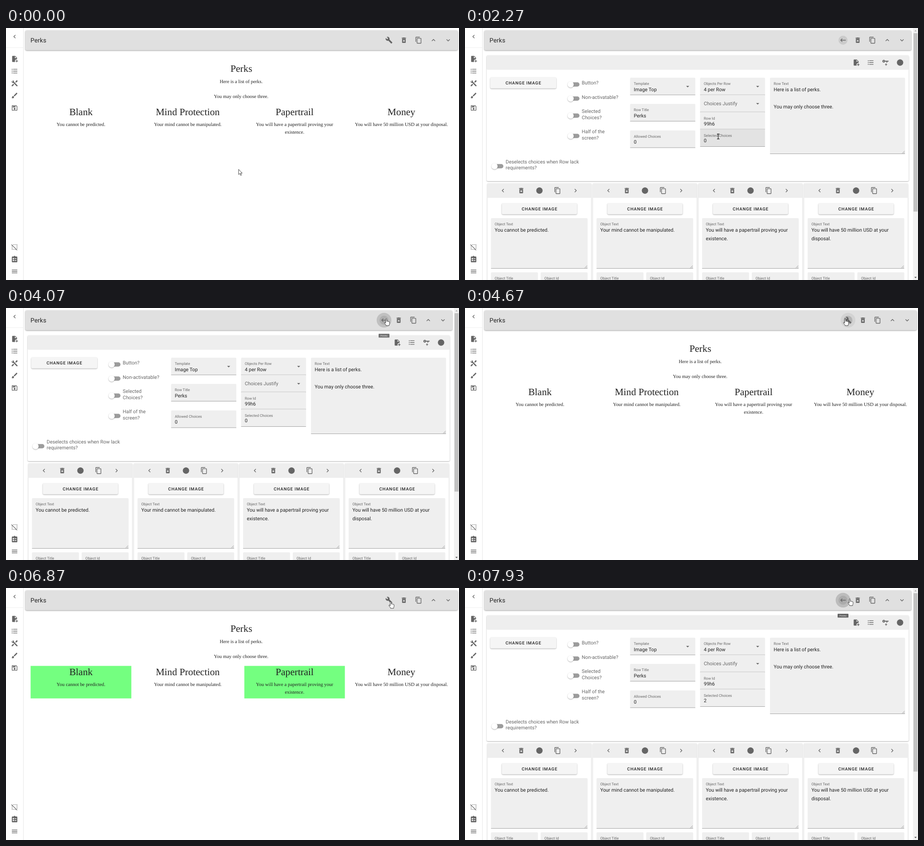
An HTML page that plays this animation: 1003 px wide and 558 px high, repeating every 8000 ms.

```html
<!DOCTYPE html>
<html lang="en">
<head>
<meta charset="utf-8">
<title>Perks editor</title>
<style>
html, body { margin: 0; width: 100%; height: 100%; overflow: hidden; background: #fff; }
svg { display: block; width: 1003px; height: 558px; }
text { font: 10.83px Roboto, sans-serif; fill: #222; text-rendering: geometricPrecision; }
.serif text { font-family: "Liberation Serif", serif; text-anchor: middle; }
.serif .big { font-size: 21.66px; }
.title { font-size: 13.6px; letter-spacing: .17px; }
.small { font-size: 8.12px; fill: #666; }
.gray { fill: #666; }
.btn { font-size: 9.48px; font-weight: 500; letter-spacing: .85px; text-anchor: middle; }
.tip { font-size: 4.4px; fill: #fff; text-anchor: middle; }
.icon { fill: #656565; fill-rule: evenodd; }
.raised { filter: drop-shadow(0 1.2px 1.3px rgba(0,0,0,.32)); }
.bar { filter: drop-shadow(0 1.8px 1.8px rgba(0,0,0,.4)); }
</style>
</head>
<body>
<svg id="stage" viewBox="0 0 1003 558"></svg>
<script>
const LOOP = 8000;
const dots = [6, 12, 18].map(y => `M2.5 ${y}a1.5 1.5 0 1 0 3 0a1.5 1.5 0 1 0-3 0M7 ${y - 1}H21v2H7z`).join('');
const seal = 'M' + Array.from({ length: 28 }, (_, i) => {
  const a = i * Math.PI / 14, r = i % 2 ? 9.8 : 11;
  return (12 + r * Math.cos(a)).toFixed(2) + ' ' + (12 + r * Math.sin(a)).toFixed(2);
}).join('L') + 'Z';

// Icon outlines on a 24 unit grid
const ICONS = {
  left: 'M15.41 16.58L10.83 12L15.41 7.41L14 6L8 12L14 18Z',
  right: 'M8.59 16.58L13.17 12L8.59 7.41L10 6L16 12L10 18Z',
  up: 'M7.41 15.41L12 10.83L16.59 15.41L18 14L12 8L6 14Z',
  down: 'M7.41 8.58L12 13.17L16.59 8.58L18 10L12 16L6 10Z',
  back: 'M21 11H6.83L10.41 7.41L9 6L3 12L9 18L10.41 16.58L6.83 13H21Z',
  drop: 'M7 10L12 15L17 10Z',
  wrench: 'M22.7 19L13.6 9.9C14.5 7.6 14 4.9 12.1 3C10.1 1 7.1 .6 4.7 1.7L9 6L6 9L1.6 4.7C.4 7.1 .9 10.1 2.9 12.1C4.8 14 7.5 14.5 9.8 13.6L18.9 22.7C19.3 23.1 19.9 23.1 20.3 22.7L22.6 20.4C23.1 20 23.1 19.3 22.7 19Z',
  trash: 'M6 19A2 2 0 0 0 8 21H16A2 2 0 0 0 18 19V7H6ZM8.46 11.88L9.87 10.47L12 12.59L14.12 10.47L15.53 11.88L13.41 14L15.53 16.12L14.12 17.53L12 15.41L9.88 17.53L8.47 16.12L10.59 14ZM15.5 4L14.5 3H9.5L8.5 4H5V6H19V4Z',
  copy: 'M19 21H8V7H19ZM19 5H8A2 2 0 0 0 6 7V21A2 2 0 0 0 8 23H19A2 2 0 0 0 21 21V7A2 2 0 0 0 19 5ZM16 1H4A2 2 0 0 0 2 3V17H4V3H16Z',
  addFile: 'M14 2H6A2 2 0 0 0 4 4V20A2 2 0 0 0 6 22H13.8A6 6 0 0 1 20 13.1V8ZM13 9V3.5L18.5 9ZM23 20H20V23H18V20H15V18H18V15H20V18H23Z',
  list: dots,
  tools: 'M21.71 20.29L20.29 21.71A1 1 0 0 1 18.88 21.71L7 9.85A4 4 0 0 1 2.22 4.7L4.76 7.24L7.24 4.76L4.7 2.22A4 4 0 0 1 9.85 7L21.71 18.88A1 1 0 0 1 21.71 20.29ZM2.29 18.88A1 1 0 0 0 2.29 20.29L3.71 21.71A1 1 0 0 0 5.12 21.71L10.59 16.25L7.76 13.42ZM20 2L16 4V6L13.83 8.17L15.83 10.17L18 8H20L22 4Z',
  brush: 'M20.71 4.63L19.37 3.29A1 1 0 0 0 17.96 3.29L9 12.25L11.75 15L20.71 6.04A1 1 0 0 0 20.71 4.63ZM7 14A3 3 0 0 0 4 17C4 18.3 2.8 19 2 19C2.9 20.2 4.5 21 6 21A4 4 0 0 0 10 17A3 3 0 0 0 7 14Z',
  save: 'M17 3H5A2 2 0 0 0 3 5V19A2 2 0 0 0 5 21H19A2 2 0 0 0 21 19V7ZM19 19H5V5H16.2L19 7.8ZM12 12a3 3 0 1 0 .01 0ZM6 6H15V10H6Z',
  unselect: 'M1 4.27L2.28 3L21 21.72L19.73 23L17 20.27V21H15V19H15.73L5 8.27V9H3V7H3.73ZM19 3h2v2h-2zM15 3h2v2h-2zM11 3h2v2h-2zM7 3h2v2h-2zM11 19h2v2h-2zM7 19h2v2h-2zM3 19h2v2h-2zM3 15h2v2h-2zM19 15h2v2h-2zM3 11h2v2h-2zM19 11h2v2h-2zM19 7h2v2h-2z',
  board: 'M19 3H14.8A3 3 0 0 0 9.2 3H5A2 2 0 0 0 3 5V20A2 2 0 0 0 5 22H19A2 2 0 0 0 21 20V5A2 2 0 0 0 19 3ZM6 8h4v4h-4zM6 14h4v4h-4zM12 9h6v2h-6zM12 15h6v2h-6z',
  menu: 'M3 6H21V8H3ZM3 11H21V13H3ZM3 16H21V18H3Z',
  key: 'M6.5 3A4.5 4.5 0 0 1 10.7 6H22V9H18V12H15V9H10.7A4.5 4.5 0 1 1 6.5 3ZM6.5 6a1.5 1.5 0 1 0 .01 0ZM13 15h2v2.5h2.5v2H15V22h-2v-2.5h-2.5v-2H13z',
  seal
};

const icon = (name, x, y) =>
  `<path class="icon" d="${ICONS[name]}" transform="translate(${x} ${y}) scale(.677) translate(-12 -12)"/>`;
const icons = (names, xs, y) => names.split(' ').map((n, i) => icon(n, xs[i], y)).join('');
const rect = (x, y, w, h, fill, cls = '', r = 0) =>
  `<rect x="${x}" y="${y}" width="${w}" height="${h}" rx="${r}" fill="${fill}" class="${cls}"/>`;
const text = (x, y, s, cls = '') => `<text x="${x}" y="${y}" class="${cls}">${s}</text>`;
const lines = (x, y, step, s, cls) => s.split('|').map((l, i) => text(x, y + i * step, l, cls)).join('');
const circle = (id, x, y, r) => `<circle id="${id}" cx="${x}" cy="${y}" r="${r}" opacity="0"/>`;

const field = (x, y, w, h, label, value, id = '') =>
  `<rect id="${id}" x="${x}" y="${y}" width="${w}" height="${h}" rx="2" fill="#efefef"/>` +
  rect(x, y + h - .6, w, .8, '#8e8e8e') +
  text(x + 8.3, y + 16.4, label, 'small') + lines(x + 8.3, y + 29.5, 19, value);
const grip = (x, y) =>
  `<path d="M${x - 6} ${y}l5.5-5.5M${x - 2.8} ${y}l2.3-2.3" stroke="#777" stroke-width=".7"/>`;
const button = (x, y, w) =>
  rect(x, y, w, 24.5, '#f5f5f5', 'raised', 2.7) + text(x + w / 2 + .4, y + 16, 'CHANGE IMAGE', 'btn');
const toggle = (x, y, s, ty) =>
  rect(x - 4.5, y - 4.7, 24, 9.4, '#9c9c9c', '', 4.7) +
  `<circle cx="${x}" cy="${y}" r="6.8" fill="#fff" class="raised"/>` + lines(x + 24.6, ty, 13.5, s, 'gray');
const header = (right, xs, first, marks) =>
  rect(43, 5.5, right - 43, 43.5, '#e0e0e0', 'bar', 2.7) + marks + text(54.3, 32, 'Perks', 'title') +
  icons(first + ' trash copy up down', xs, 27);

const OBJECTS = [
  ['Blank', 'You cannot be predicted.'],
  ['Mind Protection', 'Your mind cannot be manipulated.'],
  ['Papertrail', 'You will have a papertrail proving your|existence.'],
  ['Money', 'You will have 50 million USD at your disposal.', 'You will have 50 million USD at your|disposal.']
];

const sidebar = rect(38, 0, 1, 558, '#e6e6e6') + rect(0, 43, 38, .8, '#ebebeb') +
  [['left', 19], ['addFile', 68.5], ['list', 95.5], ['tools', 122.5], ['brush', 149.5], ['save', 177],
   ['unselect', 485], ['board', 512], ['menu', 539]].map(([n, y]) => icon(n, 19, y)).join('');

const preview = header(1000, [848, 881, 913.5, 946.5, 979], 'wrench',
    circle('wrenchOuter', 848, 27, 16.3) + circle('wrenchInner', 848, 27, 9.8)) +
  `<g class="serif">` +
  `<rect id="pick0" x="54.5" y="172.5" width="223" height="72" fill="#74ff80"/>` +
  `<rect id="pick2" x="527.7" y="172.5" width="222.6" height="72" fill="#74ff80"/>` +
  text(521, 97, 'Perks', 'big') + lines(520.7, 122.2, 32.6, 'Here is a list of perks.|You may only choose three.') +
  OBJECTS.map(([name, s], i) => {
    const x = 166 + i * 236.5;
    return text(x, 193, name, 'big') + lines(x, 217.3, 16.3, s);
  }).join('') + `</g>`;

const objectCard = ([, s, wrapped], i) => `<g transform="translate(${i * 233.7} 0)">` +
  rect(49.5, 344, 230, 230, '#fff', 'raised', 2) + rect(49.5, 344, 230, 32, '#eee') +
  icons('left trash seal copy right', [84, 124.5, 164.8, 204.8, 244.8], 360) + button(81.5, 388, 166.5) +
  field(57.5, 421, 214, 111.5, 'Object Text', wrapped || s) + grip(271, 531.5) +
  field(57.5, 541, 104, 38, 'Object Title', '') + field(167.5, 541, 104, 38, 'Object Id', '') + `</g>`;

const editor = header(988, [837, 869.5, 902, 935, 967.5], 'back',
    circle('backOuter', 837, 27, 16.3) + circle('backInner', 837, 27, 10)) +
  rect(48, 60.5, 934.5, 278.5, '#fff', 'raised', 2.7) + rect(48, 60.5, 934.5, 32, '#eee', '', 2) +
  icons('addFile list key seal', [866, 898.3, 931, 963.3], 76.5) + button(56, 109.3, 146) +
  toggle(234, 125, 'Button?', 125.3) + toggle(234, 156.3, 'Non-activatable?', 157) +
  toggle(234, 194, 'Selected|Choices?', 188) + toggle(234, 239, 'Half of the|screen?', 233) +
  toggle(65.5, 306, 'Deselects choices when Row lack|requirements?', 299.5) +
  field(365.5, 110, 144.5, 38.3, 'Template', 'Image Top') + icon('drop', 493, 129.5) +
  field(365.5, 168, 144.5, 38.5, 'Row Title', 'Perks') +
  field(365.5, 226.7, 144.5, 38.5, 'Allowed Choices', '0') +
  field(520.5, 110, 143.8, 38.3, 'Objects Per Row', '4 per Row') + icon('drop', 648, 129.5) +
  field(520.5, 148.3, 143.8, 38, '', '') + text(528.8, 171, 'Choices Justify', 'gray') + icon('drop', 648, 167.5) +
  field(520.5, 186.3, 143.8, 38, 'Row Id', '99h6') +
  field(520.5, 224.3, 143.8, 38.5, 'Selected Choices', '', 'selectedField') +
  `<text id="count" x="528.8" y="253.3"></text>` +
  field(675.3, 110, 299, 168.7, 'Row Text', 'Here is a list of perks.||You may only choose three.', 'rowField') + grip(974, 277.7) +
  OBJECTS.map(objectCard).join('') +
  `<g id="tip">${rect(825, 57, 24, 8.6, '#666', '', 1)}${text(837, 62.9, 'Preview', 'tip')}</g>` +
  rect(992, 0, 11, 558, '#f1f1f1') + rect(993, 11.5, 9, 395, '#c1c1c1') +
  `<path d="M995 7.5h5l-2.5-3z" fill="#aaa"/><path d="M995 551h5l-2.5 3z" fill="#555"/>`;

const cursors = {
  arrow: 'M0 0V11.5L2.7 9L4.6 13.4L6.4 12.6L4.5 8.3H8Z',
  hand: 'M-1.3 9.5V1.3a1.2 1.2 0 0 1 2.4 0V5.6c.3-1 2.2-.8 2.2.4c.4-.9 2.1-.6 2.1.6c.5-.7 1.8-.3 1.8.7V10.5c0 1.5-1 2.3-1 4.5H-.3c0-1.8-3-3.6-3.8-6.2c-.4-1.5 1.3-1.9 2.8.7z',
  beam: 'M-2.7-5.5H-.6L0-5L.6-5.5H2.7M0-5V5M-2.7 5.5H-.6L0 5L.6 5.5H2.7'
};

document.getElementById('stage').innerHTML =
  `<g id="preview">${preview}</g><g id="editor">${editor}</g>${sidebar}<path id="cursor" stroke="#111"/>`;
const $ = id => document.getElementById(id);
const set = (id, name, v) => $(id).setAttribute(name, v);

// Pointer path: time, x, y
const PATH = [
  [0, 515, 313], [130, 515, 313], [930, 839, 33], [1000, 839, 33], [1070, 848, 32], [1930, 848, 32],
  [2140, 610, 228], [2270, 561, 240], [2420, 529, 258], [2560, 519, 276], [2730, 590, 281], [2800, 590, 281],
  [2950, 634, 258], [3100, 575, 236], [3240, 528, 262], [3330, 580, 250], [3470, 695, 148],
  [3600, 790, 74], [3670, 790, 74], [4070, 842, 24], [5000, 842, 24], [5270, 846, 34], [5470, 846, 34],
  [5730, 655, 208], [5870, 655, 208], [6200, 224, 208], [6530, 224, 208], [6870, 852, 30],
  [7070, 852, 30], [7200, 852, 24], [LOOP, 852, 24]
];

const same = (a, b) => a[1] === b[1] && a[2] === b[2];
function slope(i, k) {
  const a = PATH[i - 1], b = PATH[i], c = PATH[i + 1];
  return !a || !c || same(a, b) || same(b, c) ? 0 : (c[k] - a[k]) / (c[0] - a[0]);
}
function pointer(t) {
  t = Math.max(0, t);
  const i = PATH.findIndex(p => p[0] > t) - 1, a = PATH[i], b = PATH[i + 1];
  const d = b[0] - a[0], u = (t - a[0]) / d, v = 1 - u;
  return [1, 2].map(k =>
    a[k] * v * v * (1 + 2 * u) + b[k] * u * u * (3 - 2 * u) +
    d * u * v * (slope(i, k) * v - slope(i + 1, k) * u));
}

const inBox = (x, y, w, h) => ([px, py]) => px > x && px < x + w && py > y && py < y + h;
const inDisc = cx => ([px, py]) => Math.hypot(px - cx, py - 27) < 17;
const overSelected = inBox(520.5, 224, 144, 39), overRow = inBox(675, 110, 299, 169);
const overWrench = inDisc(848), overBack = inDisc(837);

// Share of the last moments spent over an area, which gives the hover fade
function hover(t, over) {
  let n = 0;
  for (let k = 0; k < 10; k++) n += over(pointer(t - k * 17));
  return n / 10;
}
const ramp = (t, a, b) => Math.min(1, Math.max(0, (t - a) / (b - a)));
const shade = v => `rgb(${v},${v},${v})`;

function draw(t) {
  const editing = t >= 1530 && t < 4665 || t >= 7865;
  const pos = pointer(t);
  let kind = 'arrow';
  set('preview', 'display', editing ? 'none' : 'inline');
  set('editor', 'display', editing ? 'inline' : 'none');

  if (editing) {
    const onBack = hover(t, overBack), onRow = t > 2800 ? hover(t, overRow) : 0;
    set('backOuter', 'opacity', .16 * onBack);
    set('backInner', 'opacity', .09);
    set('tip', 'opacity', onBack);
    set('selectedField', 'fill', shade(239 - 13 * hover(t, overSelected)));
    set('rowField', 'fill', shade(239 - 13 * onRow));
    $('count').textContent = t > 6400 ? 2 : 0;
    if (overBack(pos)) kind = 'hand';
    else if (overSelected(pos) || overRow(pos)) kind = 'beam';
  } else {
    const press = t < 4000 ? ramp(t, 1260, 1440) : ramp(t, 7660, 7840);
    const fade = t > 4600 ? 1 - ramp(t, 4800, 5270) : 0;
    set('wrenchOuter', 'opacity', .17 * press + .06 * fade);
    set('wrenchInner', 'opacity', .14 * fade);
    set('pick2', 'display', t >= 5790 ? 'inline' : 'none');
    set('pick0', 'display', t >= 6400 ? 'inline' : 'none');
    if (overWrench(pos)) kind = 'hand';
  }
  set('cursor', 'd', cursors[kind]);
  set('cursor', 'fill', kind === 'beam' ? 'none' : '#fff');
  set('cursor', 'stroke-width', kind === 'beam' ? 1.1 : .8);
  set('cursor', 'transform', `translate(${pos[0].toFixed(2)} ${pos[1].toFixed(2)})`);
}

const start = performance.now();
function tick() {
  draw((performance.now() - start) % LOOP);
  requestAnimationFrame(tick);
}
tick();
</script>
</body>
</html>
```
